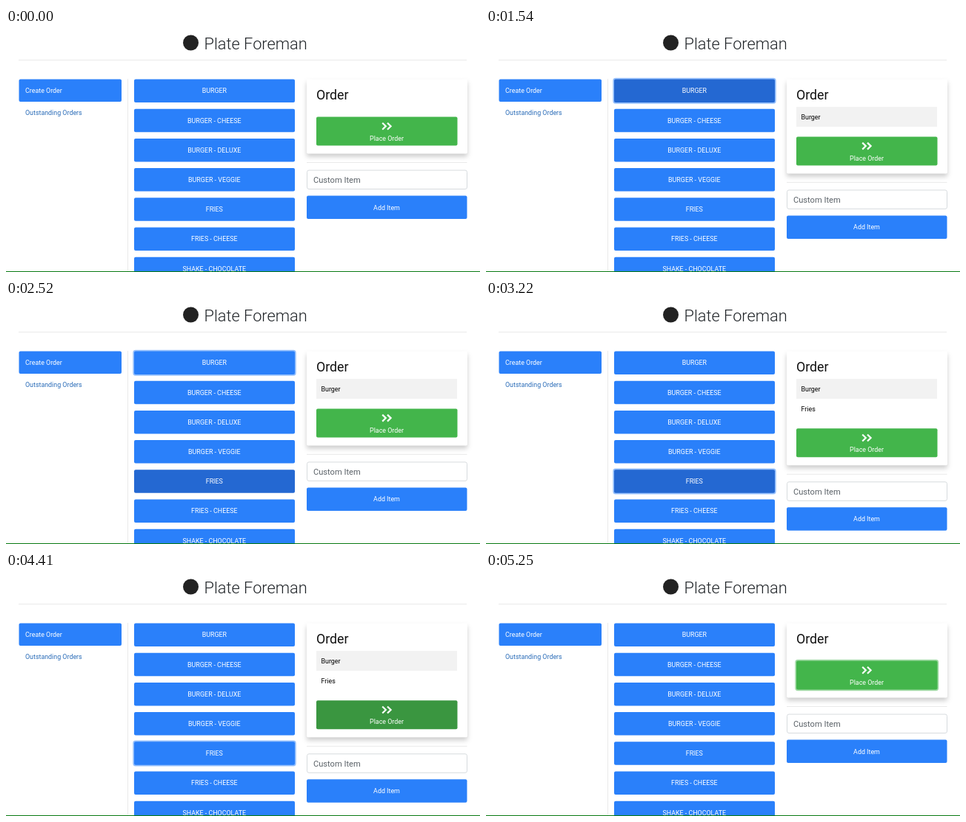
Recreate the animation shown at these times as an HTML page. Size 640x331 px, loop 5.32 s.

```html
<!DOCTYPE html>
<html lang="en">
<head>
<meta charset="utf-8">
<title>Plate Foreman</title>
<style>
  html, body { margin: 0; width: 100%; height: 100%; overflow: hidden; background: #fff; }
  svg { display: block; font: 8.9px Roboto, Arial, sans-serif; }
  .btn { fill: #2a80fa; }
  .light { fill: #fff; }
  .mid { text-anchor: middle; }
  .rule { fill: #e9e9e9; }
  #card { filter: drop-shadow(0 4px 3px rgba(0, 0, 0, .2)); }
</style>
</head>
<body>
<svg width="640" height="331" viewBox="0 0 640 331">
  <circle cx="249.5" cy="20" r="10.5" fill="#222"/>
  <text x="267.5" y="29" font-size="21.8" font-weight="300" fill="#212529" textLength="">Plate Foreman</text>
  <rect class="rule" x="17" y="43" width="605" height="1"/>
  <rect class="rule" x="164" y="69" width="1" height="262"/>

  <rect class="btn" x="17.5" y="69.5" width="138.5" height="30.5" rx="2"/>
  <text class="light" x="26" y="88">Create Order</text>
  <text x="26" y="118.3" fill="#2a6cb8">Outstanding Orders</text>

  <g id="menu"></g>

  <rect id="card" x="406" y="69.5" width="217" height="101" rx="2" fill="#fff"/>
  <text x="419" y="97" font-size="17.8" fill="#111">Order</text>
  <g id="row0">
    <rect x="419" y="107" width="190" height="27" fill="#f2f2f2"/>
    <text x="425.5" y="124">Burger</text>
  </g>
  <text id="row1" x="425.5" y="151">Fries</text>

  <g id="lower">
    <rect id="place" x="419" y="120.5" width="190.5" height="39" rx="2"/>
    <path d="M508.2 128.7l4.6 4.5-4.6 4.5M515 128.7l4.6 4.5-4.6 4.5" fill="none" stroke="#fff" stroke-width="2.2"/>
    <text class="light mid" x="514" y="152.7">Place Order</text>
    <rect class="rule" x="406" y="182" width="216.5" height="1"/>
    <rect x="406.5" y="193" width="216" height="25.5" rx="2.5" fill="#fff" stroke="#d3d7db" stroke-width=".9"/>
    <text x="415" y="210" font-size="11.1" fill="#5b6268">Custom Item</text>
    <rect class="btn" x="406" y="227.5" width="216.5" height="31.5" rx="2"/>
    <text class="light mid" x="514" y="246.5">Add Item</text>
  </g>
  <rect y="330" width="640" height="1" fill="#087a12"/>
</svg>
<script>
const LOOP = 5320, STEP = 70, ROW = 26.9;
const BLUE = [42, 128, 250], BLUE_HOVER = [36, 104, 210];
const GREEN = [67, 181, 75], GREEN_HOVER = [58, 150, 64];
const $ = id => document.getElementById(id);

const items = ['BURGER', 'BURGER - CHEESE', 'BURGER - DELUXE', 'BURGER - VEGGIE',
  'FRIES', 'FRIES - CHEESE', 'SHAKE - CHOCOLATE'];
$('menu').innerHTML = items.map((name, i) => {
  const y = 69.5 + i * 40.2;
  return `<rect class="btn" x="173" y="${y}" width="217" height="31.5" rx="2"/>
    <text class="light mid" x="281.3" y="${y + 18.8}">${name}</text>`;
}).join('');
const buttons = $('menu').querySelectorAll('rect');

const within = (t, from, to) => t >= from && t < to;
const ramp = (t, start) => Math.min(1, Math.max(0, (t - start) / 150));
const fade = (t, from, to) => ramp(t, from) - ramp(t, to);

function paint(el, base, over, hover, focus) {
  const color = base.map((v, i) => Math.round(v + (over[i] - v) * hover));
  el.style.fill = `rgb(${color})`;
  el.style.stroke = `rgba(${base},${focus * 0.5})`;
  el.style.strokeWidth = 3.4 * focus;
  el.style.paintOrder = 'stroke';
}

function draw(now) {
  const t = Math.floor(now % LOOP / STEP) * STEP;
  const burger = within(t, 1400, 4550), fries = within(t, 2660, 4550);
  const shift = ROW * (burger + fries);

  paint(buttons[0], BLUE, BLUE_HOVER, fade(t, 840, 1750), fade(t, 1260, 2520));
  paint(buttons[4], BLUE, BLUE_HOVER, fade(t, 1960, 3500), fade(t, 2520, 4410));
  paint($('place'), GREEN, GREEN_HOVER, fade(t, 3850, 5040), fade(t, 4410, LOOP));

  $('row0').style.display = burger ? '' : 'none';
  $('row1').style.display = fries ? '' : 'none';
  $('card').setAttribute('height', 101 + shift);
  $('lower').setAttribute('transform', `translate(0 ${shift})`);
  requestAnimationFrame(() => draw(performance.now()));
}
draw(performance.now());
</script>
</body>
</html>
```
